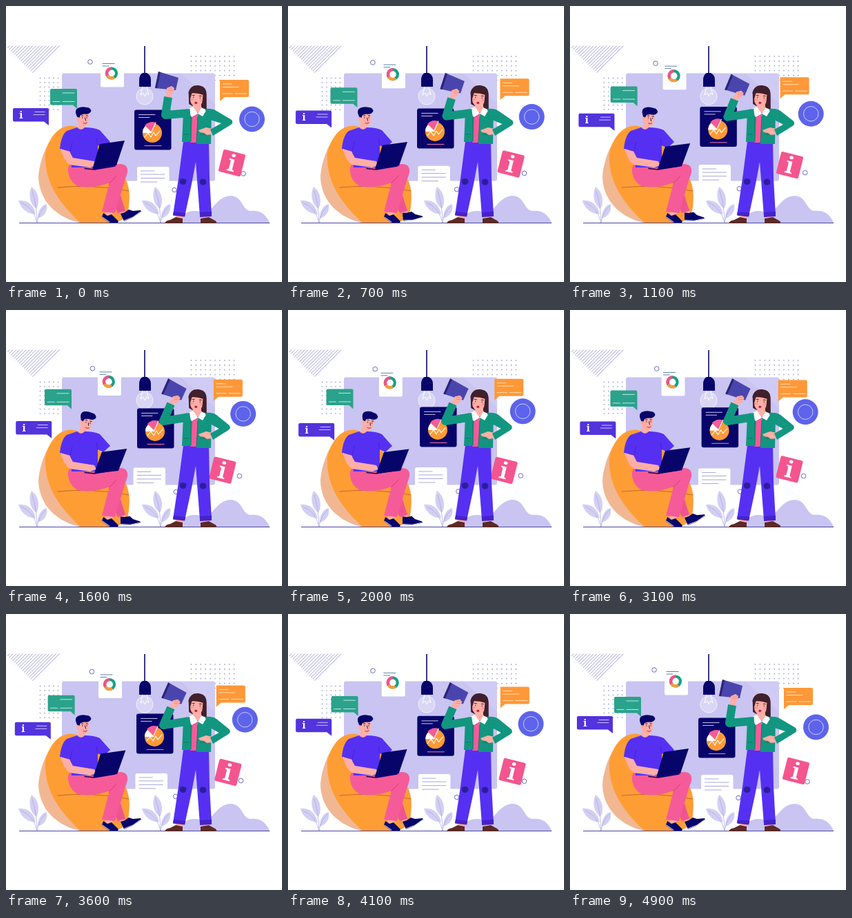
An HTML page that plays this animation: 400x400 px, repeating every 5 s.

```html
<!DOCTYPE html>
<html lang="en">
<head>
<meta charset="utf-8">
<title>Sharing information</title>
<style>
html, body { margin: 0; width: 100%; height: 100%; overflow: hidden; background: #fff; }
svg { display: block; width: 100%; height: 100%; }
text { font-family: "Noto Serif", "Liberation Serif", serif; font-weight: 900; fill: #fff; text-anchor: middle; }
.line { fill: none; stroke-linecap: round; stroke-linejoin: round; }
.skin { fill: #ffaea6; }
.navy { fill: #08056a; }
.teal { fill: #129680; }
.violet { fill: #5530f3; }
.pink { fill: #f55b98; }
.lav { fill: #c9c4f1; }
.leaf { fill: #d3cff3; }
.hair { fill: #40202b; }
.ring { fill: none; stroke: #6c6ac4; stroke-width: 1; }
</style>
</head>
<body>
<svg viewBox="0 0 400 400">
  <path id="hatch" class="line" stroke="#a5a0d8" stroke-width="1"/>
  <path id="dots" class="line" stroke="#8683c2" stroke-width="1.6"/>

  <!-- scenery -->
  <rect class="lav" x="81" y="97.5" width="222" height="156" rx="3"/>
  <path d="M254 98H300Q303 98 303 101V142Z" fill="#d0cbf4"/>
  <path class="lav" d="M250 314C254 299 268 295 282 298C301 303 302 277 325 275C343 275 342 296 354 297C368 295 377 302 382 314Z"/>
  <g id="plant">
    <path class="leaf" d="M46 308C46 297 51 289 59 287C61 298 55 305 46 308Z"/>
    <path class="leaf" d="M44 294C34 287 32 273 37 262C47 269 50 284 44 294Z"/>
    <path class="leaf" d="M43 302C31 301 21 294 18 282C31 280 41 289 43 302Z"/>
    <path class="line" stroke="#a9a4de" stroke-width=".7" d="M38 268Q45 290 45 314M57 290Q47 300 45 314M22 285Q40 292 45 314"/>
  </g>
  <use href="#plant" x="179"/>
  <path d="M201 58V98" stroke="#08056a" stroke-width="1.6"/>
  <circle cx="201" cy="131" r="12" fill="#fff" fill-opacity=".3" stroke="#f3f1ff" stroke-width="1"/>
  <path class="line" stroke="#fff" stroke-width="1" d="M198 117L195 129L199 126L201 131L204 126L207 129L204 117"/>
  <path class="navy" d="M198 97H204Q210 100 210 107V117H193V107Q193 100 198 97Z"/>

  <!-- floating cards -->
  <g data-move="4.5 5 2400"><circle class="ring" cx="122" cy="81" r="3.3"/></g>
  <g data-move="-5.5 8.5 2400">
    <rect x="137" y="77" width="34" height="40.5" rx="2" fill="#fff"/>
    <path class="line" stroke="#5b83a0" stroke-width="1" d="M140 83.5H157M140 87H149"/>
    <g class="line" stroke-width="4.2" style="stroke-linecap:butt">
      <circle cx="153" cy="97.5" r="7" stroke="#16a085"/>
      <path stroke="#f4508b" d="M153 90.5A7 7 0 0 0 147 101"/>
      <path stroke="#ff9a36" d="M147 101A7 7 0 0 0 157 103.2"/>
    </g>
  </g>
  <g data-move="5.5 -11 2450">
    <rect class="navy" x="186" y="150.5" width="53.5" height="58" rx="3"/>
    <path class="line" stroke="#c6c2f0" stroke-width="1" d="M192.5 157.5H216M192.5 161.5H208"/>
    <path class="line" stroke="#fb7ba8" stroke-width="1" d="M201 202.5H225"/>
    <circle cx="212" cy="184" r="14" fill="#ff9a36"/>
    <path fill="#fff" d="M212 184L198 184A14 14 0 0 1 202 174Z"/>
    <path class="pink" d="M211 182L201 173A14 14 0 0 1 217 169Z"/>
    <path class="line" stroke="#fff" stroke-width="1.1" d="M211 182L217 169M201 190L206 184L210 190L214 183L217 188L223 181"/>
  </g>
  <g data-move="-6 -5 2000">
    <rect x="190" y="233" width="46.5" height="28.5" rx="2.5" fill="#fff"/>
    <path d="M228 261H235V265Z" fill="#fff"/>
    <path class="line" stroke="#a9a7d8" stroke-width="1" d="M195.5 239H215M195.5 244H230M195.5 249.5H230M195.5 255H219"/>
  </g>
  <g data-move="3 -4 2400"><circle class="ring" cx="244" cy="266.5" r="3.2"/></g>
  <g data-move="5.5 17 2350">
    <path fill="#5233dc" d="M12 148H60Q62 148 62 150V173L55 167.5H12Q10 167.5 10 165.5V150Q10 148 12 148Z"/>
    <text x="22" y="162.5" font-size="15">i</text>
    <path class="line" stroke="#cdc3ff" stroke-width="1" d="M42 153.5H56M40 157.5H56"/>
  </g>
  <g data-move="-8.5 -5.5 1900">
    <path fill="#2ba28c" d="M66 120H101Q103 120 103 122V149L97 143.5H66Q64 143.5 64 141.5V122Q64 120 66 120Z"/>
    <path class="line" stroke="#bfe9dd" stroke-width="1" d="M82 126H99M68 138.5H78M82 138.5H99"/>
  </g>
  <g data-move="-11 -7.5 2200">
    <path fill="#ff9838" d="M311 107H350Q352 107 352 109V130Q352 132 350 132H317L310 138V109Q309 107 311 107Z"/>
    <path class="line" stroke="#ffdfb0" stroke-width="1" d="M314 113H327M314 117.5H337M314 127H328M332 127H349"/>
  </g>
  <g data-move="-18 -19 2500">
    <circle cx="356.500" cy="164" r="18.5" fill="#5d63ea"/>
    <circle cx="356.500" cy="164" r="10.7" fill="none" stroke="#c9ceff" stroke-width="1"/>
  </g>
  <g data-move="-7 -3 2300"><circle class="ring" cx="344" cy="243" r="3.3"/></g>
  <g data-move="-14.5 5 1900">
    <g transform="translate(327.500 227.500) rotate(14)">
      <rect x="-16.500" y="-16.500" width="33" height="33" rx="2.5" fill="#f4558f"/>
      <text y="12" font-size="33">i</text>
    </g>
  </g>

  <path d="M19 314.5H382" stroke="#4a47a3" stroke-width="1.2"/>

  <!-- seated man -->
  <path fill="#f1b793" d="M90 174C68 177 50 214 47 246C47 276 66 304 106 314H130L120 185Z"/>
  <path fill="#ff9d35" d="M90 174C74 176 62 192 57 214C55 255 78 287 108 314H150C168 314 177 306 178 290C180 275 179 257 170 245L120 185C108 176 98 172 90 174Z"/>
  <path class="line" stroke="#b7622a" stroke-width=".9" d="M75 263Q125 258 178 268"/>
  <path class="skin" d="M163 292H171L174 301L167 303ZM143 295H155L154 304L146 305Z"/>
  <path fill="#ee5492" d="M148 248L172 250L164 268L173 297L162 300L151 277Z"/>
  <path class="pink" d="M92 230H134L166 229C178 230 178 239 173 250L158 300L139 298L150 256C136 262 118 264 104 261C94 256 89 245 90 235Z"/>
  <path class="line" stroke="#c93770" stroke-width=".8" d="M150 256Q156 252 160 246"/>
  <g class="navy">
    <path d="M141 300L147 304L153 302L163 312L162 314H150L139 306Z"/>
    <path class="line" stroke="#fff" stroke-width=".8" d="M140 306L150 313"/>
  </g>
  <g id="foot" class="navy">
    <path d="M166 301L172 299L178 295L184 297L195 296L196 298L183 307L171 312Z"/>
    <path class="line" stroke="#fff" stroke-width=".8" d="M171 311L184 306L195 298"/>
  </g>
  <g id="head">
    <path class="skin" d="M105 166H114V178Q110 183 104 178Z"/>
    <path class="skin" d="M104 154H119L120 162Q120 174 113 174Q105 173 103 164Z"/>
    <path class="navy" d="M105 165L102 158Q99 151 104 148Q110 145 117 147Q122 147 123.500 152Q121 158 113 156.500L108 158Z"/>
    <circle class="skin" cx="104" cy="163.500" r="2.4"/>
    <path class="line" stroke="#2b1a3a" stroke-width="1" d="M109.500 159H112M116 159H118.500M110.800 161.500V162.300M117 161.500V162.300M114.500 162L115.500 166"/>
    <path class="line" stroke="#d23b56" stroke-width="1.2" d="M112 169.500Q114.500 171 117 169"/>
  </g>
  <path class="violet" d="M103 176Q109 182 114 176Q128 176 136 180L151 197L141 206L133 202V234H95L93 211L78 207Q80 187 88 181Z"/>
  <path class="line" stroke="#3d1fbb" stroke-width=".7" d="M93 211L96 198M133 202L131 192"/>
  <path class="skin" d="M79 207L92 211L97 220L128 225L131 231L122 234L92 230Q84 224 79 207Z"/>
  <path id="laptop" class="navy"/>
  <path class="line" stroke="#08056a" stroke-width="1.5" d="M114 235.500L128 237L158 232"/>

  <!-- standing woman -->
  <path class="skin" d="M246 298H257V309H246ZM284 298H295V309H284Z"/>
  <path class="violet" d="M257 196H294L295 250L298 304L281 305L277 252L275 226L269 258L259 305L242 303L250 250Z"/>
  <path fill="#4424c8" d="M243 298L260 300L259 305.500L242 303.500ZM281 299L298 298V305L281 306Z"/>
  <ellipse fill="#2a1f9a" cx="256.500" cy="254.500" rx="5" ry="4.5"/>
  <ellipse fill="#2a1f9a" cx="285.500" cy="255" rx="4.8" ry="4.5"/>
  <path fill="#5b2a27" d="M246 306L256 308V315H230Q231 311 238 310ZM282 308L294 306L301 310Q306 312 305 315H282Z"/>
  <g transform="translate(-1.500) rotate(5 278 150)">
    <path class="hair" d="M266 143L264 126Q266 115 277 115Q289 115 290 127L292 149L283 151Z"/>
  </g>
  <path class="skin" d="M271 140H283V152L278 160L270 152Z"/>
  <path class="pink" d="M267 154H281L280 198H267Z"/>
  <path class="teal" d="M262 149L270 156L268 197H255L257 152ZM285 149L278 157L276 200H297L298 150Z"/>
  <path class="line" stroke="#0b6f68" stroke-width=".8" d="M268 160V196M278 161L276 198M258 186H265M282 186H292"/>
  <path class="line" stroke="#0d7a6a" stroke-width="1.1" stroke-dasharray="0 4.5" d="M261 163V194M291 160V198"/>
  <path fill="#fff" d="M271 146L278 156L269 161L262 150ZM284 146L278 156L285 160L291 150Z"/>
  <g transform="translate(-1.500) rotate(5 278 150)">
    <path class="skin" d="M267 124H286L286 134Q285 145 277 147Q268 145 267 135Z"/>
    <path class="hair" d="M267 137L264 127Q267 116 278 116Q289 116 290 127L292 149L285 147V128Q276 126 269 127Z"/>
    <path class="line" stroke="#40202b" stroke-width="1" d="M270 130H273M280 130H283M271.700 132.500V133.300M281.300 132.500V133.300"/>
    <path fill="#ff7d86" d="M268 135h4v2.500h-4zM281 135h4v2.500h-4z" opacity=".55"/>
    <ellipse cx="276" cy="140.500" rx="2" ry="1.6" fill="#b9203c"/>
  </g>
  <path class="skin" d="M299 178L290 176L279 180L281 183L287 184L291 187L299 186Z"/>
  <path id="elbow" class="teal"/>
  <path id="forearm" class="line" stroke="#ffaea6" stroke-width="7"/>
  <path id="sleeve" class="line" stroke="#129680" stroke-width="12" style="stroke-linecap:butt"/>
  <g id="horn">
    <path fill="#4a45ad" d="M221 95L250 104L246 122L216 119Z"/>
    <path fill="#2a2478" d="M221 95L224 96L219 119.300L216 119Z"/>
    <path class="skin" d="M233 119L240 116L244 119L242 126L237 129L232 126Z"/>
    <path class="line" stroke="#e98580" stroke-width=".7" d="M236 120L241 119M236 122.500L242 122"/>
  </g>
</svg>
<script>
const LOOP = 5000, STEP = 100;
const $ = id => document.getElementById(id);
const set = (id, name, value) => $(id).setAttribute(name, value);
const ease = (t, a, b) => (1 - Math.cos(Math.PI * Math.min(1, Math.max(0, (t - a) / (b - a))))) / 2;
// rises over a..b, stays, falls over c..d
const pulse = (t, a, b, c, d) => ease(t, a, b) - ease(t, c, d);
const swing = (t, peak) => pulse(t, 0, peak, peak, 4900);

let hatch = "", dots = "";
for (let x = 5; x <= 77; x += 4.8) hatch += `M${x} 58L${x / 2} ${58 + x / 2}`;
function grid(x0, y0, cols, rows, gap) {
  for (let i = 0; i < cols * rows; i++)
    dots += `M${x0 + i % cols * gap} ${y0 + Math.floor(i / cols) * gap}h0`;
}
grid(49.5, 104.5, 5, 8, 6.5);
grid(268.5, 73, 10, 6, 6.9);
set("hatch", "d", hatch);
set("dots", "d", dots);

const movers = [...document.querySelectorAll("[data-move]")].map(el => [el, ...el.dataset.move.split(" ").map(Number)]);

function draw(t) {
  for (const [el, dx, dy, peak] of movers) {
    const k = swing(t, peak);
    el.setAttribute("transform", `translate(${dx * k} ${dy * k})`);
  }
  const nod = pulse(t, 600, 1600, 1800, 3100);
  set("head", "transform", `rotate(${14 * nod} 111 183)`);

  const tap = pulse(t, 0, 1000, 2200, 3200);
  set("foot", "transform", `rotate(${24 * tap} 170 300)`);

  const l = swing(t, 1900);
  set("laptop", "d", `M${136 + 3 * l} ${200 + 6 * l}L${172 + 3.5 * l} ${195 + 6.5 * l}L${160 + 3 * l} ${231 + 2 * l}L${125 + 3 * l} 237Z`);

  const a = pulse(t, 0, 1400, 4000, 4900);
  set("horn", "transform", `translate(${9 * a} ${7 * a}) rotate(${12 * a} 237 118)`);
  const wrist = `${235 + 4 * a} ${132 + 4 * a}`;
  set("sleeve", "d", `M267 155L${231 - 3 * a} ${158 + 3 * a}L${wrist}`);
  set("forearm", "d", `M${wrist}L${238 + 8 * a} ${124 + 5 * a}`);
  const ex = 329 - 3.5 * a, ey = 169 + 2 * a;
  set("elbow", "d", `M288 149Q299 148 305 152L${ex - 2} ${ey - 4}Q${ex + 1} ${ey} ${ex - 3} ${ey + 3}L300 188L296 179L${ex - 17} ${ey + 1}L296 165Z`);
}

const start = performance.now();
function frame() {
  const t = (performance.now() - start) % LOOP;
  draw(Math.floor(t / STEP) * STEP);
  requestAnimationFrame(frame);
}
draw(0);
requestAnimationFrame(frame);
</script>
</body>
</html>
```
